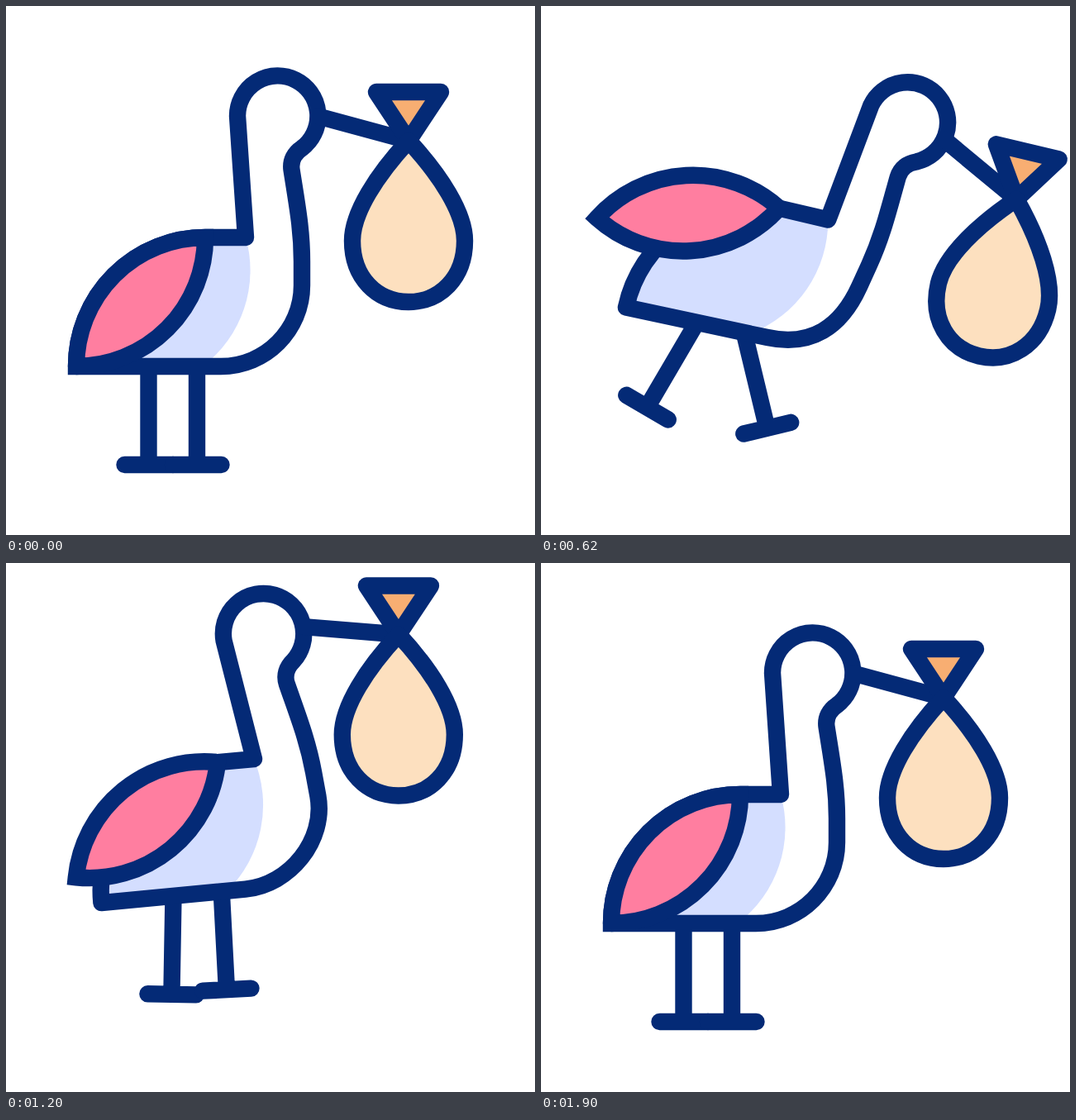
An HTML page for the animation above (2.4 s loop, 640 by 640 pixels).

```html
<!DOCTYPE html>
<html lang="en">
<head>
<meta charset="utf-8">
<title>Stork</title>
<style>
html, body { margin: 0; width: 100%; height: 100%; overflow: hidden; background: #fff; }
svg { display: block; width: 100%; height: 100%; }
.line { fill: none; stroke: #042a76; stroke-width: 20.4; stroke-linecap: round; stroke-linejoin: round; }
</style>
</head>
<body>
<svg viewBox="0 0 640 640">
  <defs><clipPath id="inside"><path id="clip"/></clipPath></defs>
  <g class="line">
    <path id="legL" d="M172.5 436V555M143.5 555H202"/>
    <path id="legR" d="M231 436V555M202 555H260.5"/>
  </g>
  <path id="shade" fill="#d4deff" clip-path="url(#inside)"/>
  <path id="body" class="line"/>
  <path id="wing" class="line" style="fill:#ff7ea0;stroke-linejoin:miter"
        d="M241 280A156 156 0 0 0 85 436A156 156 0 0 0 241 280Z"/>
  <path id="beak" class="line"/>
  <g id="bag" class="line">
    <path fill="#f8ae72" d="M448 104H526L487 163Z"/>
    <path fill="#fde0bf" d="M487 163C449 204 419 250 419 284C419 329 449 358 487 358C525 358 555 329 555 284C555 250 525 204 487 163Z"/>
  </g>
</svg>
<script>
const LOOP = 2400;
const END = 1900;
const BAG_LAG = 18;
const PIVOT = [290, 335];
const WING_ROOT = [241, 280];
const KNOT = [487, 163];

// Turning points as [ms, value]; every track rests at 0 at both ends.
const swings = {
  x:    [[600, 34.5], [1200, 20], [1600, 0]],
  y:    [[460, -20], [780, -33.5], [1040, -51], [1720, 0]],
  body: [[560, 12.5], [1200, -5.4], [1800, 0]],
  neck: [[600, 24.5], [690, 24.5], [1230, -10.7], [1800, 0]],
  wing: [[600, 31], [780, 0], [1100, 13], [1580, -2]],
  legL: [[560, 32], [1000, 1], [1200, 1], [1580, 13.8]],
  legR: [[500, -20.5], [780, -3], [1200, -3], [1580, -16.9]],
  bag:  [[570, 14], [1080, -8], [1200, 0], [1580, 11]]
};

// Eases in and out of turning points and passes smoothly through the others.
function slope(keys, i) {
  if (i === 0 || i === keys.length - 1) return 0;
  const rise = j => (keys[j + 1][1] - keys[j][1]) / (keys[j + 1][0] - keys[j][0]);
  const a = rise(i - 1), b = rise(i);
  return a * b <= 0 ? 0 : 2 * a * b / (a + b);
}

function sample(name, t) {
  if (t <= 0 || t >= END) return 0;
  const keys = [[0, 0], ...swings[name], [END, 0]];
  const i = keys.findIndex(key => key[0] > t) - 1;
  const [t0, v0] = keys[i], [t1, v1] = keys[i + 1];
  const h = t1 - t0, u = (t - t0) / h;
  return v0 + (v1 - v0) * u * u * (3 - 2 * u)
    + h * u * (1 - u) * ((1 - u) * slope(keys, i) - u * slope(keys, i + 1));
}

// Returns a function that carries a resting point along with one body part.
function carrier(part, t) {
  const a = sample(part, t) * Math.PI / 180, c = Math.cos(a), s = Math.sin(a);
  const px = PIVOT[0] + sample('x', t), py = PIVOT[1] + sample('y', t);
  return (x, y) => {
    const dx = x - PIVOT[0], dy = y - PIVOT[1];
    return [px + dx * c - dy * s, py + dx * s + dy * c];
  };
}

const set = (id, name, value) => document.getElementById(id).setAttribute(name, value);

function place(id, rest, at, deg) {
  set(id, 'transform', `translate(${at}) rotate(${deg}) translate(${-rest[0]} ${-rest[1]})`);
}

function draw(t) {
  const b = carrier('body', t), n = carrier('neck', t);

  const outline = `M${b(85, 436)}L${b(260, 436)}C${b(314, 436)} ${n(358, 392)} ${n(358, 338)}L${n(358, 309)}`
    + `C${n(358, 270)} ${n(352, 240)} ${n(345.5, 198)}C${n(344, 187)} ${n(349, 178)} ${n(358, 172)}`
    + `A48.7 48.7 0 1 0 ${n(280, 133)}L${n(290, 280)}L${b(241, 280)}A156 156 0 0 0 ${b(85, 436)}Z`;
  set('body', 'd', outline);
  set('clip', 'd', outline);
  set('shade', 'd', `M${n(290, 280)}A146 146 0 0 1 ${b(238, 436)}L${b(85, 436)}L${b(85, 270)}L${b(241, 270)}Z`);

  for (const [leg, hip] of [['legL', [172.5, 436]], ['legR', [231, 436]]]) {
    place(leg, hip, b(...hip), sample(leg, t));
  }
  place('wing', WING_ROOT, b(...WING_ROOT), sample('body', t) + sample('wing', t));

  // The bag trails the head slightly sideways, stretching the beak.
  const knot = [carrier('neck', t - BAG_LAG)(...KNOT)[0], n(...KNOT)[1]];
  set('beak', 'd', `M${n(378, 133.5)}L${knot}`);
  place('bag', KNOT, knot, sample('bag', t));
}

const start = performance.now();
function tick() {
  draw((performance.now() - start) % LOOP);
  requestAnimationFrame(tick);
}
tick();
</script>
</body>
</html>
```
